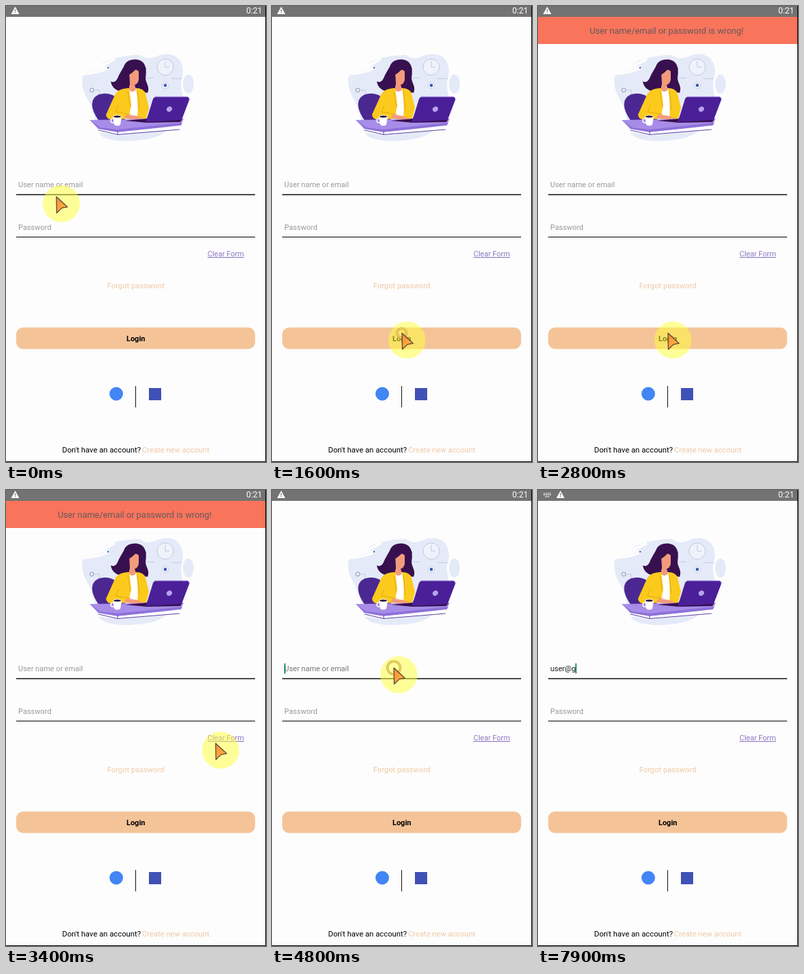
Recreate the animation shown at these times as an HTML page. Size 382 px wide and 672 px high, loop 8000 ms.

```html
<!DOCTYPE html>
<html lang="en">
<head>
<meta charset="utf-8">
<title>Login screen</title>
<style>
  html, body { margin: 0; width: 100%; height: 100%; overflow: hidden; background: #fdfdfd; }
  svg { display: block; width: 382px; height: 672px; }
  text { font: 11px Roboto, Arial, sans-serif; }
  .hint { fill: #999; }
  .peach { fill: #f1c8a3; }
  .mid { text-anchor: middle; }
</style>
</head>
<body>
<svg viewBox="0 0 382 672">
  <defs>
    <linearGradient id="arrowFill" x1="0" y1="0" x2="1" y2="1">
      <stop offset="0" stop-color="#f58a3c"/>
      <stop offset="1" stop-color="#ffc13a"/>
    </linearGradient>
  </defs>
  <rect width="382" height="672" fill="#fdfdfd"/>

  <g id="illustration">
    <g fill="#e5eaf8">
      <path d="M112 108C113 94 133 98 147 90C163 76 187 69 202 75C217 82 221 69 240 71C258 74 263 91 258 108C254 122 264 137 258 154C249 173 238 187 220 193C196 201 150 202 139 190C128 177 133 160 123 143C116 130 111 121 112 108Z"/>
      <ellipse cx="268" cy="115" rx="8" ry="14"/>
      <path d="M139 86Q158 73 198 72L199 77Q165 83 144 89Z"/>
    </g>
    <path d="M121 93Q145 88 160 78M112 100Q137 99 151 91" fill="none" stroke="#fdfdfd" stroke-width="4"/>
    <g fill="none" stroke="#c2c9de">
      <circle cx="234" cy="90" r="12" fill="#eff2fb"/>
      <path d="M234 81V90H240"/>
      <circle cx="234" cy="117" r="4.5" fill="#fff"/>
      <circle cx="126" cy="124" r="3" stroke="#8d99b8"/>
      <path d="M129 124H137V132M205 106H218M243 107H258"/>
    </g>
    <g fill="#3760bd">
      <circle cx="234" cy="117" r="2.4"/>
      <circle cx="150" cy="91" r="1.2"/>
      <circle cx="205" cy="92" r="1"/>
    </g>

    <path d="M127 141C130 127 151 126 161 134L176 170H137C130 160 125 150 127 141Z" fill="#4b2891"/>
    <path d="M174 87C178 77 196 76 202 84C207 90 206 100 205 106C205 113 212 119 208 128L196 126H172C164 126 155 121 154 111C160 114 163 109 165 104C168 97 171 94 174 87Z" fill="#381050"/>
    <path d="M181 96L195 93L195 109Q193 116 189 116V123L181 125L182 114Z" fill="#f29b7b"/>
    <path d="M177 96Q179 84 190 84Q198 86 197 99Q194 94 190 94Q184 100 181 101L181 117L175 113Z" fill="#381050"/>
    <path d="M179 121L192 121L196 166H177Z" fill="#fff"/>
    <path d="M181 118L189 116L191 123Q187 129 181 124Z" fill="#f29b7b"/>
    <path d="M181 121Q165 121 160 131L147 160Q147 169 163 167L180 166L184 146Z" fill="#fcca1c"/>
    <path d="M191 121Q202 121 205 129L210 150L206 166H193Q195 143 191 121Z" fill="#fcca1c"/>
    <path d="M165 146L161 156L184 160M179 126L183 150M193 125L196 154" fill="none" stroke="#dca016" stroke-width=".8"/>
    <path d="M177 160L192 162L203 166L188 168L174 165Z" fill="#f29b7b"/>

    <path d="M123 168L261 166L257 175L164 184L138 181Z" fill="#a78de8"/>
    <path d="M123 168L138 179L164 182L259 172L257 176L164 186L136 181Z" fill="#8e70d8"/>
    <path d="M136 182L164 186L255 177V182L164 190L136 186Z" fill="#fff"/>
    <path d="M136 183L164 189.5L255 182M164 185V189" fill="none" stroke="#5c41a1"/>
    <path d="M175 169L207 166L259 167L256 171L207 172Z" fill="#381050"/>
    <path d="M219 134L267 134Q270 135 269 139L258 168L206 171Q205 168 208 163L216 137Q217 135 219 134Z" fill="#4b1f98"/>
    <path d="M219 134L267 134Q270 135 269 139" fill="none" stroke="#8263d0"/>
    <ellipse cx="240" cy="152" rx="4.2" ry="3.6" transform="rotate(-35 240 152)" fill="#b7a2ee"/>
    <path d="M157 163H170L168 175Q164 178 159 175Z" fill="#fff"/>
    <circle cx="157" cy="169" r="3" fill="none" stroke="#fff" stroke-width="1.5"/>
    <ellipse cx="163.5" cy="163" rx="6" ry="2" fill="#291940" stroke="#fff"/>
  </g>

  <g id="form">
    <text id="userHint" class="hint" x="18" y="267">User name or email</text>
    <text id="userText" x="18" y="267" fill="#222"></text>
    <rect id="caret" y="255.5" width="1.7" height="15" fill="#0b7e68"/>
    <text class="hint" x="18" y="330">Password</text>
    <path d="M15 278H366" stroke="#111" stroke-width="1.3"/>
    <path d="M15 340.5H366" stroke="#000"/>
    <text x="296" y="369" fill="#8d78c4" text-decoration="underline">Clear Form</text>
    <text class="peach mid" x="190.7" y="416" style="font-size:11.2px">Forgot password</text>
    <rect x="15" y="473.7" width="351" height="31.8" rx="10" fill="#f4c498"/>
    <text class="mid" x="190.7" y="494" style="font-weight:700">Login</text>
    <circle cx="162" cy="571.5" r="10" fill="#4285f4"/>
    <path d="M190.5 560V591.5" stroke="#111"/>
    <rect x="210" y="563" width="18" height="18" fill="#3f51b5"/>
    <text x="82.5" y="658" style="font-size:11.3px">Don't have an account?</text>
    <text class="peach" x="200" y="658" style="font-size:11.2px">Create new account</text>
  </g>

  <g id="banner">
    <rect y="16" width="382" height="40" fill="#f8745b"/>
    <text class="mid" x="189" y="41" fill="#625a5e" style="font-size:12.8px">User name/email or password is wrong!</text>
  </g>

  <rect width="382" height="16" fill="#737373"/>
  <g id="keyboard" fill="#c8c8c8">
    <path d="M8 4H19V8H8ZM10 9H17V10.5H10Z"/>
    <path d="M8 5.5H19M10.5 4V8M13.5 4V8M16.5 4V8" stroke="#737373" stroke-width=".6"/>
  </g>
  <g id="warning">
    <path d="M13.5 1L19.5 12H7.5Z" fill="#fff"/>
    <path d="M13.5 4.8V8.2M13.5 9.3V10.6" stroke="#737373" stroke-width="1.3"/>
  </g>
  <text x="353" y="11.3" fill="#fff" style="font-size:12px">0:21</text>
  <path d="M381.5 0V671.5H0" fill="none" stroke="#000"/>

  <g id="ring" fill="none">
    <circle stroke="#984953" stroke-width="3.6" opacity=".75"/>
    <circle id="ringCore" stroke="#ffe9a0" stroke-width="1.2" stroke-dasharray="1.6 .7"/>
  </g>
  <g id="pointer">
    <circle cx="7.3" cy="10.3" r="27.3" fill="#ffff3c" opacity=".52"/>
    <path d="M0 0L16.3 15.2L8.2 16.6L.5 24Z" fill="url(#arrowFill)" stroke="#5b4038" stroke-width="1.2" stroke-linejoin="round"/>
  </g>
</svg>
<script>
const LOOP = 8000;
const $ = id => document.getElementById(id);

// Pointer tip: time, x, y
const path = [
  [0, 74, 281], [40, 74, 281], [350, 226, 536], [600, 206, 434], [750, 206, 434],
  [1300, 191, 482], [2950, 191, 482], [3600, 320, 362], [3780, 320, 362],
  [4180, 179, 278], [4500, 179, 262], [5000, 179, 262], [5500, 190, 265], [LOOP, 190, 265]
];
const clicks = [[1470, 190.5, 482], [3785, 320, 362], [4585, 179, 262]];
const typing = [[5800, "u"], [6000, "us"], [6200, "use"], [6400, "user"], [7200, "user@"], [7800, "user@g"]];
const FOCUS = 4600, BLINK = 500, RING_TIME = 380;

const clamp = u => Math.min(1, Math.max(0, u));
const easeOut = u => 1 - (1 - u) ** 2;
const show = (el, on) => el.setAttribute("visibility", on ? "visible" : "hidden");
const move = (el, x, y) => el.setAttribute("transform", `translate(${x} ${y})`);

function pointerAt(t) {
  const i = path.findIndex(key => key[0] > t);
  const [t0, x0, y0] = path[i - 1], [t1, x1, y1] = path[i];
  const u = easeOut((t - t0) / (t1 - t0));
  return [x0 + (x1 - x0) * u, y0 + (y1 - y0) * u];
}

function drawRing(t) {
  const click = clicks.find(([start]) => t >= start && t < start + RING_TIME);
  show($("ring"), click);
  if (!click) return;
  const [start, x, y] = click, age = t - start, r = 3 + age * 0.03;
  move($("ring"), x, y);
  for (const circle of $("ring").children) circle.setAttribute("r", r);
  $("ring").setAttribute("opacity", clamp((RING_TIME - age) / 120));
  $("ringCore").setAttribute("opacity", 0.7 * clamp((r - 6.2) / 0.7));
}

function drawField(t) {
  const [since, value] = typing.findLast(([at]) => t >= at) || [FOCUS, ""];
  const text = $("userText");
  if (text.textContent !== value) text.textContent = value;
  show($("userHint"), !value);
  $("userHint").style.fill = t >= FOCUS ? "#777" : "";
  $("caret").setAttribute("x", 18 + (value ? text.getComputedTextLength() - 0.5 : 0));
  show($("caret"), t >= FOCUS && Math.floor((t - since) / BLINK) % 2 === 0);
}

function draw(t) {
  move($("pointer"), ...pointerAt(t));
  show($("pointer"), t < 5800);
  drawRing(t);
  drawField(t);

  show($("banner"), t >= 1700 && t < 3880);
  move($("banner"), 0, -40 * (1 - easeOut(clamp((t - 1700) / 400))));

  const typingMode = t >= 5000;
  show($("keyboard"), typingMode);
  move($("warning"), typingMode ? 19.5 : 0, 0);
}

const begin = performance.now();
function tick() {
  draw((performance.now() - begin) % LOOP);
  requestAnimationFrame(tick);
}
tick();
</script>
</body>
</html>
```
